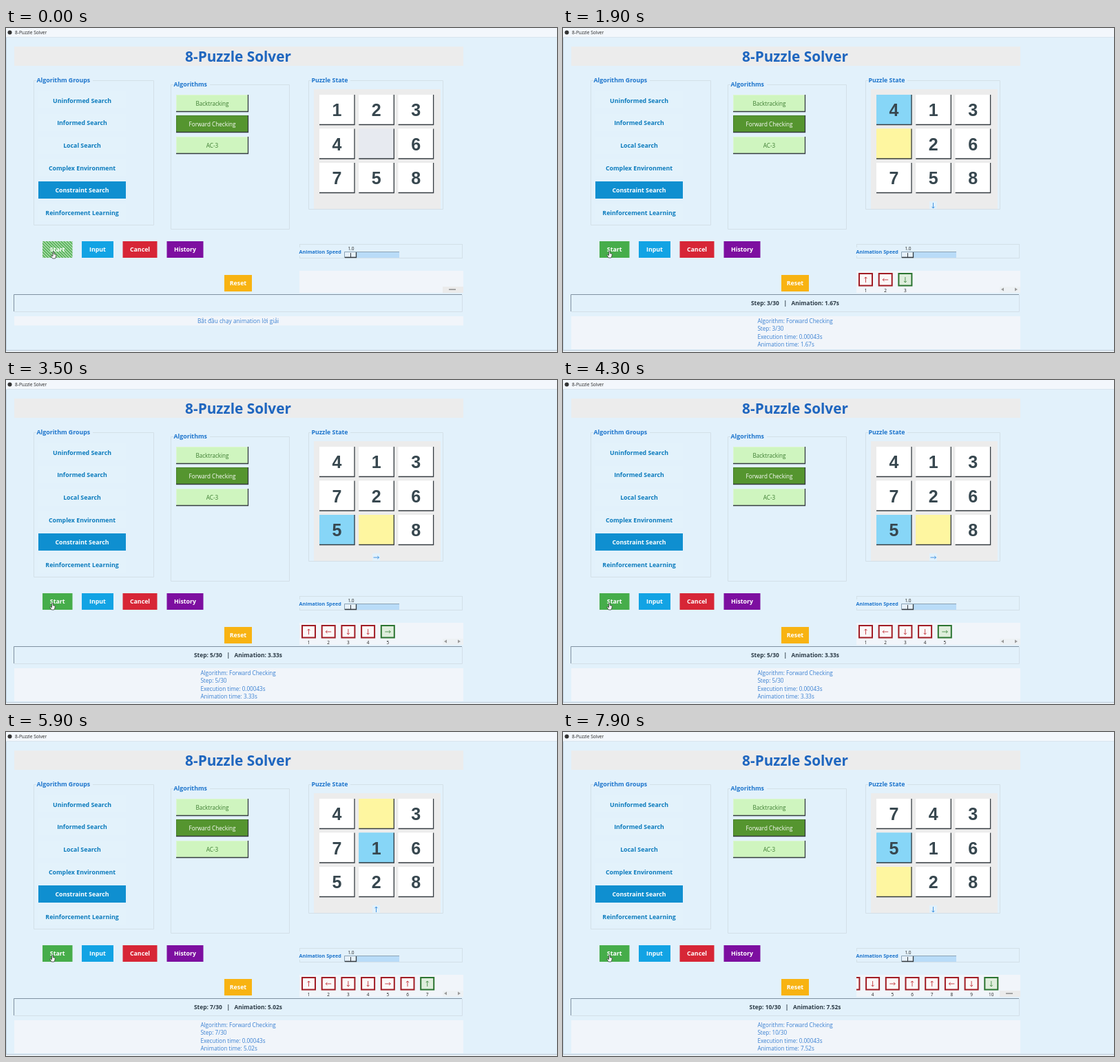
An HTML page for the animation above (8 s loop, 800 by 471 pixels).

```html
<!DOCTYPE html>
<html lang="en">
<head>
<meta charset="utf-8">
<title>8-Puzzle Solver</title>
<style>
  html, body { margin: 0; width: 100%; height: 100%; overflow: hidden; background: #e2f1fb; }
  svg { display: block; }
  text { font-family: "Open Sans", "Noto Sans", sans-serif; font-size: 8.15px; white-space: pre; }
  .bold { font-weight: 700; font-size: 8.8px; }
  .mid { text-anchor: middle; }
  .digit { font: 700 25px "Liberation Sans", Arial, sans-serif; fill: #37474f; }
</style>
</head>
<body>
<svg id="stage" width="800" height="471" viewBox="0 0 800 471">
  <defs>
    <pattern id="hatch" width="3" height="3" patternUnits="userSpaceOnUse" patternTransform="rotate(-45)">
      <rect width="3" height="3" fill="#46ad4a"/>
      <rect width="1.3" height="3" fill="#c9e6c6"/>
    </pattern>
    <clipPath id="strip"><rect x="426" y="353" width="238" height="32"/></clipPath>
  </defs>
  <g id="base"></g>
  <g id="live"></g>
  <g id="pointer">
    <path d="M-.8-4.6Q0-5.4.8-4.6V-1.3L3.2-.7Q4-.4 3.8.6L3.2 3.2 2.4 5H-1.4L-3.6 1.6Q-3.9.6-2.8.6L-1 1.8Z"
      fill="#fff" stroke="#333" stroke-width=".8"/>
  </g>
</svg>
<script>
const LOOP = 8000, FIRST = 150, PRESS = 100;
const MOVES = "ULDDRUULDD";
const TIMES = [0.01, 0.84, 1.67, 2.51, 3.33, 4.18, 5.02, 5.85, 6.68, 7.52];
const SHIFT = { U: -3, D: 3, L: -1, R: 1 };
const ANGLE = { U: 0, R: 90, D: 180, L: 270 };
const BLUE = "#1c74cc", EDGE = "#d3e0e8", DARK = "#343b40";
const byId = id => document.getElementById(id);

const rect = (x, y, w, h, fill, more = "") =>
  `<rect x="${x}" y="${y}" width="${w}" height="${h}" fill="${fill}" ${more}/>`;
const text = (x, y, str, fill, cls = "", size = 0) =>
  `<text x="${x}" y="${y}" fill="${fill}" class="${cls}"${size ? ` style="font-size:${size}px"` : ""}>${str}</text>`;
const line = (d, stroke, width = 1) =>
  `<path d="${d}" fill="none" stroke="${stroke}" stroke-width="${width}"/>`;
const arrow = (x, y, dir, color, len = 4) =>
  `<g transform="translate(${x} ${y}) rotate(${ANGLE[dir]})">` +
  line(`M0 ${len}V${-len}M-2 ${2.2 - len}L0 ${-len}L2 ${2.2 - len}`, color, .85) + "</g>";

// A raised box: light top-left edge, dark bottom-right edge.
const raised = (x, y, w, h, fill, light = fill, dark = DARK) =>
  rect(x, y, w, h, fill) +
  line(`M${x + .5} ${y + h}V${y + .5}H${x + w}`, light) +
  line(`M${x + w - .5} ${y}V${y + h - .5}H${x}`, dark, 1.3);

// A group frame whose top edge starts after its label.
const group = (x, y, right, bottom, label, gap) =>
  line(`M${x + 4} ${y}H${x}V${bottom}H${right}V${y}H${gap}`, EDGE) +
  text(x + 4, y + 2.4, label, BLUE, "bold");

const flat = (x, y, w, h, fill, label) =>
  rect(x, y, w, h, fill) + text(x + w / 2, y + h / 2 + 3.4, label, "#fff", "bold mid");

function drawBase() {
  let s = rect(0, 0, 800, 471, "#e2f1fb") + rect(0, 0, 800, 13, "#f3f7fc");
  s += line("M0 13.5H800", "#d9e5ee") + line("M.5 14V468", "#c3d5e4");
  s += rect(0, 468, 800, 1.2, "#bccbd8") + rect(0, 469.2, 800, 1.8, "#eaf1f7");
  s += '<circle cx="5.5" cy="6.5" r="3" fill="#333"/>' + text(13, 9, "8-Puzzle Solver", "#222", "", 6.6);
  s += rect(12, 27, 652, 28, "#ececec") + text(337, 49, "8-Puzzle Solver", "#1f66bf", "bold mid", 20.8);

  s += group(40.5, 76.5, 214.5, 286.5, "Algorithm Groups", 126);
  ["Uninformed Search", "Informed Search", "Local Search", "Complex Environment",
    "Constraint Search", "Reinforcement Learning"].forEach((name, i) => {
    const y = 108.5 + i * 32.7, on = i === 4;
    s += rect(47, Math.round(y - 16.3), 127, 25, on ? "#0f8fd0" : "#e3f2fb");
    s += text(110.5, y, name, on ? "#fff" : "#0b7bbd", "bold mid");
  });

  s += group(239.5, 82.5, 411.5, 292.5, "Algorithms", 296);
  ["Backtracking", "Forward Checking", "AC-3"].forEach((name, i) => {
    const y = Math.round(97 + i * 30.3), on = i === 1;
    s += raised(247, y, 105, 25, on ? "#55952f" : "#cff5bf", on ? "#47802a" : "#dcf6d0");
    s += text(299.5, y + 15.8, name, on ? "#fff" : "#3c7c30", "mid");
  });

  s += group(439.5, 76.5, 634.5, 263.5, "Puzzle State", 500);
  s += rect(447, 89, 184, 174, "#ececec");

  s += flat(110, 310, 46, 24, "#12a3e4", "Input") + flat(169.5, 310, 50, 24, "#d72636", "Cancel");
  s += flat(233.5, 310, 53, 24, "#7d0fa0", "History") + flat(317, 359, 40, 24, "#f8b312", "Reset");

  s += rect(426.5, 314.5, 236, 20, "none", `stroke="${EDGE}"`);
  s += rect(425, 319, 63, 12, "#e2f1fb") + text(425.5, 327.5, "Animation Speed", BLUE, "bold", 7.2);
  s += text(501, 322.8, "1.0", "#222", "mid", 6.5);
  s += rect(491, 325, 80, 9, "#b9dcf8") + line("M491.5 334V325.5H571", "#8ba3b5");
  s += raised(492, 326, 17, 8, "#e6f1fa") + line("M500.5 327V333", DARK);

  s += rect(426, 353, 238, 32, "#f1f5fa");
  s += line("M11.5 412V387.5H662", "#7f91a1") + line("M12 412.5H662.5V388", "#d3dfe8");
  byId("base").innerHTML = s;
}

function boardAt(step) {
  const cells = [1, 2, 3, 4, 0, 6, 7, 5, 8];
  let blank = 4, moved = -1;
  for (const m of MOVES.slice(0, step)) {
    moved = blank;
    blank += SHIFT[m];
    cells[moved] = cells[blank];
    cells[blank] = 0;
  }
  return { cells, moved };
}

function drawBoard(step) {
  const { cells, moved } = boardAt(step);
  return cells.map((n, i) => {
    const x = 455 + (i % 3) * 57.3, y = 97 + Math.floor(i / 3) * 49.5;
    const fill = !n ? (step ? "#fef6a0" : "#e7eaf0") : i === moved ? "#87d6f7" : "#fff";
    return raised(x, y, 51.5, 44, fill) +
      (n ? `<text x="${x + 25.5}" y="${y + 31}" class="digit mid">${n}</text>` : "");
  }).join("");
}

function drawStrip(step) {
  const pitch = 28.7, scroll = Math.max(0, pitch * step + 26 - 237);
  let s = "";
  for (let i = 0; i < step; i++) {
    const x = 439.5 + i * pitch - scroll, now = i === step - 1;
    const edge = now ? "#2b7430" : "#a11c24";
    s += rect(x - 9.5, 357, 19, 17.5, now ? "#dfeedd" : "#fbf8f8", `stroke="${edge}" stroke-width="2"`);
    s += arrow(x, 366, MOVES[i], now ? "#3f8a40" : "#c02a30");
    s += text(x, 384, i + 1, "#222", "mid", 6.5);
  }
  s = `<g clip-path="url(#strip)">${s}</g>`;
  if (!step || scroll) return s + rect(634, 376, 30, 9, "#ebebeb") + rect(643, 379.5, 10, 1.2, "#777");
  return s + rect(634, 376, 30, 9, "#edf1f4") +
    '<path d="M640 377.5V382.5L636 380ZM656 377.5V382.5L660 380Z" fill="#9b9b9b"/>';
}

function drawInfo(step) {
  if (!step) return rect(12, 419, 652, 13.5, "#f1f5fa") +
    text(337, 428.8, "Bắt đầu chạy animation lời giải", "#3a80d2", "mid", 8.3);
  const time = TIMES[step - 1].toFixed(2) + "s", count = `Step: ${step}/30`;
  const rows = ["Algorithm: Forward Checking", count, "Execution time: 0.00043s", "Animation time: " + time];
  return text(337, 403.3, `${count}   |   Animation: ${time}`, "#2b3a45", "bold mid", 8.4) +
    rect(12, 419, 652, 48, "#f1f5fa") +
    rows.map((row, i) => text(282.4, 428.8 + i * 11.5, row, "#3a80d2")).join("") +
    rect(532, 252, 11, 11, "#e2f1fb") + arrow(537.5, 258, MOVES[step - 1], "#2a86dc");
}

let shown = "";
function frame() {
  const t = performance.now() % LOOP;
  const step = TIMES.filter(s => t >= FIRST + (s - TIMES[0]) * 1000).length;
  const pressed = t < PRESS, key = step + "/" + pressed;
  if (key !== shown) {
    shown = key;
    byId("live").innerHTML = drawBoard(step) + drawStrip(step) + drawInfo(step) +
      flat(53, 310, 43.5, 24, pressed ? "url(#hatch)" : "#46ad4a", "Start");
    byId("pointer").setAttribute("transform", pressed ? "translate(69 330)" : "translate(67.5 329)");
  }
  requestAnimationFrame(frame);
}

drawBase();
frame();
</script>
</body>
</html>
```
